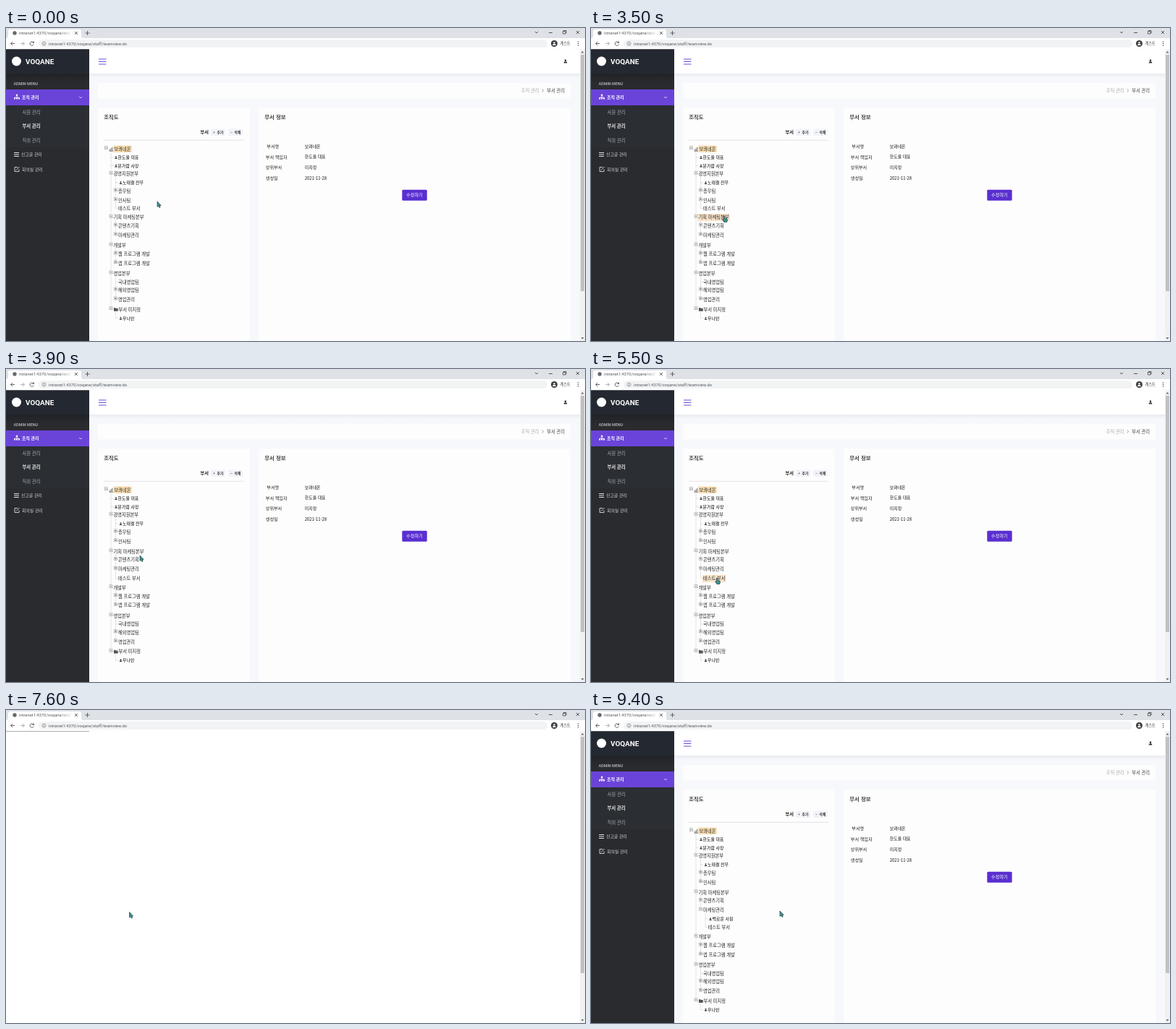
Recreate the animation shown at these times as an HTML page. Size 800 by 433 pixels, loop 9.5 s.

```html
<!DOCTYPE html>
<html lang="ko">
<head>
<meta charset="utf-8">
<style>
  html, body { margin: 0; width: 100%; height: 100%; overflow: hidden; background: #f7f8fc; }
  svg { display: block; width: 800px; height: 433px; }
  text { font-family: "Noto Sans CJK KR", "Noto Sans CJK", sans-serif; white-space: pre; }
  .latin { font-family: Roboto, sans-serif; }
</style>
</head>
<body>
<svg id="stage" viewBox="0 0 800 433">
  <defs>
    <linearGradient id="shade" x2="0" y2="1">
      <stop stop-color="#e9ebf0"/><stop offset="1" stop-color="#f7f8fc"/>
    </linearGradient>
    <linearGradient id="dim" x2="0" y2="1">
      <stop stop-opacity=".2"/><stop offset="1" stop-opacity="0"/>
    </linearGradient>
    <linearGradient id="fade">
      <stop stop-color="#fff" stop-opacity="0"/><stop offset="1" stop-color="#fff"/>
    </linearGradient>
  </defs>
  <g id="page"></g><g id="status"></g><g id="tree"></g><g id="cursor"></g>
</svg>
<script>
const $ = id => document.getElementById(id);
const LOOP = 9500, STEP = 100;
const ADDRESS = 'intranet1:4370/voqane/staff/teamview.do';

// y is the vertical centre of the text
const text = (x, y, s, size, fill = '#222', weight = 400, cls = '') =>
  `<text x="${x}" y="${y + size * .37}" font-size="${size}" fill="${fill}" font-weight="${weight}" class="${cls}">${s}</text>`;
const rect = (x, y, w, h, fill, more = '') =>
  `<rect x="${x}" y="${y}" width="${w}" height="${h}" fill="${fill}" ${more}/>`;
const line = (d, stroke, w = 1, more = '') =>
  `<path d="${d}" fill="none" stroke="${stroke}" stroke-width="${w}" ${more}/>`;
const shape = (d, fill) => `<path d="${d}" fill="${fill}"/>`;
const circle = (x, y, r, fill) => `<circle cx="${x}" cy="${y}" r="${r}" fill="${fill}"/>`;
const person = (x, y, s = 1, fill = '#333') =>
  `<g transform="translate(${x} ${y}) scale(${s})">${circle(0, -1.2, 1.3, fill)}${shape('M-2.4 2.5q0-2.3 2.4-2.3t2.4 2.3z', fill)}</g>`;

function browser() {
  return rect(0, 0, 800, 14, '#dee1e6') +
    shape('M0 14q3 0 3-3V5q0-3 3-3h95q3 0 3 3v6q0 3 3 3z', '#fff') +
    text(18, 7, ADDRESS.slice(0, 27), 5.8, '#55585d', 400, 'latin') +
    rect(76, 3, 15, 9, 'url(#fade)') +
    line('M95 5l4 4m0-4l-4 4', '#444', .8) + line('M109.5 7h6m-3-3v6', '#444', .8) +
    line('M731 5l2 2 2-2M750 6.5h5M788 4l4 4m0-4l-4 4', '#333', .8) +
    line('M769.5 4.5h3.5v3.5h-3.5zM770.5 4.5v-1h3.5v3.5h-1', '#333', .7) +
    rect(0, 14, 800, 15.5, '#fff') + rect(45, 16, 703, 11, '#f1f3f4', 'rx="5.5"') +
    line('M12 21.5H6.5m2.5-2.5l-2.5 2.5 2.5 2.5', '#555', .9) +
    line('M20 21.5h5.5m-2.5-2.5l2.5 2.5-2.5 2.5', '#aaa', .9) +
    `<circle cx="52.5" cy="21.5" r="2.5" fill="none" stroke="#666" stroke-width=".6"/>` +
    line('M52.5 20v.6m0 .7v1.8', '#666', .7) +
    text(59, 21.5, ADDRESS, 5.8, '#55585d', 400, 'latin') +
    circle(757.5, 21.5, 4.5, '#3c4043') + person(757.5, 21.5, .95, '#fff') +
    text(765.5, 21.5, '게스트', 5.2, '#333') +
    [19, 21.5, 24].map(y => circle(790.5, y, .7, '#444')).join('');
}

function sidebar() {
  return rect(0, 29.5, 115, 404, '#2a2b2f') + rect(0, 29.5, 115, 33.5, '#242830') +
    rect(0, 63, 115, 14, 'url(#dim)') +
    circle(14.5, 46, 6.5, '#fff') + text(27, 46.2, 'VOQANE', 9.9, '#fff', 700, 'latin') +
    text(10.5, 76.8, 'ADMIN MENU', 5.4, '#b9bbc0', 500, 'latin') +
    rect(0, 85, 115, 22, '#6a44d9') + rect(0, 107, 115, 58, '#2b2e33') +
    line('M15 93v3m-3 2v-2h6v2M15 96v2', '#fff', .8) +
    rect(13.8, 91.8, 2.4, 2, '#fff') + [11, 14, 17].map(x => rect(x, 96.5, 2, 2, '#fff')).join('') +
    text(22, 95.6, '조직 관리', 5.9, '#fff', 700) + line('M101 95l2 2 2-2', '#fff', .7) +
    text(22.5, 116.3, '사원 관리', 6.3, '#a9abb1') +
    text(22.5, 135.6, '부서 관리', 6.3, '#e8e8ea', 700) +
    text(22.5, 155.3, '직위 관리', 6.3, '#a9abb1') +
    line('M11 172.5h7m-7 2.5h7m-7 2.5h7', '#ddd', 1.2) + text(21, 175.3, '신고글 관리', 5.9, '#d5d6d9') +
    line('M16 192.5h-4v6h6v-3m-4 1l4.5-4.5', '#ddd', .9) + text(22, 195.8, '회의실 관리', 5.9, '#d5d6d9');
}

function content() {
  const card = (x, y, w, h) => rect(x, y, w, h, '#fdfdfe', 'rx="2"');
  const info = [['부서명', '보콰네온', 163.5], ['부서 책임자', '한도율 대표', 178.3],
    ['상위부서', '미지정', 193], ['생성일', '2021-11-28', 207.7]];
  return rect(115, 29.5, 678, 404, '#f7f8fc') + rect(115, 63, 678, 6, 'url(#shade)') +
    rect(115, 29.5, 678, 33.5, '#fff') +
    line('M128 43h10.5M128 46.5h10.5M128 50h10.5', '#6a4dd6', 1) + person(773, 46, 1) +
    card(127, 76, 653, 21.5) + card(127, 110, 209.5, 330) + card(349, 110, 431, 330) +
    text(711.7, 86.5, '조직 관리', 6.3, '#aaa') + line('M740.5 84.5l2.5 2-2.5 2', '#888', .7) +
    text(747.2, 86.5, '부서 관리', 6.3, '#444') +
    text(135.2, 123, '조직도', 7.4, '#444', 700) + text(357.3, 123, '부서 정보', 7.4, '#444', 700) +
    text(268.5, 144, '부서', 6.2, '#222', 700) +
    [['+', '추가', 283], ['−', '삭제', 307]].map(([sign, s, x]) =>
      rect(x, 139.5, 20, 9.5, '#f2f3f9', 'rx="1.5"') + text(x + 3, 144.2, sign, 5.2) +
      text(x + 8.5, 144.2, s, 4.8, '#333', 700)).join('') +
    line('M135 155.3h193', '#dcdde2', .8) +
    info.map(([k, v, y], i) => text(i ? 358.8 : 360.3, y, k, 6.1) + text(412.8, y, v, 5.9, '#111')).join('') +
    rect(547.3, 223.7, 34.4, 15, '#5a2fd0', 'rx="1.5"') + text(553, 231.2, '수정하기', 6.2, '#fff') +
    rect(793, 29.5, 7, 404, '#f1f1f1') + rect(794, 37, 5, 327, '#c1c1c1') +
    shape('M794.5 34.5l2-2.5 2 2.5zM794.5 428l2 2.5 2-2.5z', '#666');
}

// [level, kind, label, y]; kinds: - open, + closed, p person, f folder, r root
const HEAD = [[0, 'r', '보콰네온', 167.2], [1, 'p', '한도율 대표', 179], [1, 'p', '문가람 사장', 190.5],
  [1, '-', '경영지원본부', 202], [2, 'p', '노태결 전무', 214], [2, '+', '총무팀', 225.5], [2, '+', '인사팀', 238.3]];
const MID = [[1, '-', '기획 마케팅본부', 262], [2, '+', '콘텐츠기획', 273.5], [2, '+', '마케팅관리', 286.5]];
const TAIL = [[1, '-', '개발부', 300.5], [2, '+', '웹 프로그램 개발', 312.5], [2, '+', '앱 프로그램 개발', 325.3],
  [1, '-', '영업본부', 339.5], [2, '', '국내영업팀', 351.2], [2, '+', '해외영업팀', 362.5],
  [2, '+', '영업관리', 375.5], [1, 'f', '부서 미지정', 389.2], [2, 'p', '우나빈', 401.5]];
const MOVED = '테스트 부서';
const shift = (rows, dy) => rows.map(([l, k, s, y]) => [l, k, s, y + dy]);

function rowsAt(t) {
  if (t < 3800) return [...HEAD, [2, '', MOVED, 249.7], ...MID, ...TAIL];
  const mid = shift(MID, -9.7);
  if (t < 7700) return [...HEAD, ...mid, [2, '', MOVED, 290], ...shift(TAIL, 1.7)];
  if (t < 8500) return [...HEAD, ...mid, ...shift(TAIL, -9.8)];
  mid[2][1] = '-';
  return [...HEAD, ...mid, [3, 'p', '백로운 사원', 289], [3, '', MOVED, 300.3], ...shift(TAIL, 13.2)];
}

const TREE_FONT = 6.25;
const branchX = level => 138.5 + 6.5 * level;
const labelX = ([level, kind]) => branchX(level) + 3.6 + ({ r: 7.5, p: 6, f: 7 }[kind] || 0);
const labelWidth = s => [...s].reduce((w, c) => w + (c === ' ' ? .224 : .92) * TREE_FONT, 0);
const isOver = (row, p) => Math.abs(p.y - row[3]) < 4.5 &&
  p.x > labelX(row) && p.x < labelX(row) + labelWidth(row[2]);

function drawTree(rows, hover) {
  let lines = '', nodes = '';
  rows.forEach((row, i) => {
    const [level, kind, label, y] = row, x = branchX(level), tx = labelX(row);
    let end = 0;
    for (let j = i + 1; j < rows.length && rows[j][0] > level; j++)
      if (rows[j][0] === level + 1) end = rows[j][3];
    if (end) lines += `M${x + 6.5} ${y + 4}V${end}`;
    lines += `M${x} ${y}h4`;
    if (kind && kind !== 'p') {
      nodes += rect(x - 2, y - 3.5, 4, 4, '#fff', 'stroke="#999" stroke-width=".6"') +
        line(`M${x - 1.2} ${y - 1.5}h2.4` + (kind === '+' ? 'm-1.2-1.2v2.4' : ''), '#333', .6);
    }
    if (kind === 'r') nodes += line(`M${x + 4} ${y + 3}h5.5M${x + 5} ${y + 2.5}v-2m1.7 2v-3.5m1.7 3.5v-5`, '#666', .9);
    if (kind === 'p') nodes += person(x + 7, y, .75);
    if (kind === 'f') nodes += shape(`M${x + 4} ${y - 2.2}h2l.7.8h3v4h-5.7z`, '#555');
    if (kind === 'r' || row === hover)
      nodes += rect(tx - .8, y - 4.3, labelWidth(label) + 1.6, 8.6, kind === 'r' ? '#fde2b4' : '#fbe5cd',
        'stroke="#f3cf98" stroke-width=".5"');
    nodes += text(tx, y, label, kind === 'p' ? 5.9 : TREE_FONT, kind === 'p' ? '#000' : '#222');
  });
  return line(lines, '#aaa', .6, 'stroke-dasharray="1 1"') + nodes;
}

// [time, x, y] of the pointer tip
const PATH = [[0, 209, 240], [400, 209, 240], [1200, 175, 249], [1600, 175, 249], [2100, 181, 249.5],
  [2700, 184, 260], [3600, 184, 260], [3900, 185, 258], [4300, 185, 258], [5100, 174, 289], [5500, 174, 289],
  [6300, 175, 276], [7200, 175, 276], [7700, 170, 280], [7900, 170, 280], [8300, 152, 275], [8600, 152, 275],
  [9300, 261, 278], [LOOP, 261, 278]];
const DRAGS = [[1700, 2800], [5600, 6700]];
const LOADS = [[2900, 3400], [6800, 7500]];
const BLANKS = [[3700, 3800], [7600, 7700]];
const during = (spans, t) => spans.find(([a, b]) => t >= a && t < b);

function pointerAt(t) {
  const i = PATH.findIndex(p => p[0] > t), [t0, x0, y0] = PATH[i - 1], [t1, x1, y1] = PATH[i];
  const u = (t - t0) / (t1 - t0), e = u * u * (3 - 2 * u);
  return { x: x0 + (x1 - x0) * e, y: y0 + (y1 - y0) * e };
}

function drawPointer({ x, y }, hand) {
  const d = hand
    ? 'M-.8 .5q.8-1 1.5 0v3l3 .6q1 .3.8 1.4l-.7 3h-4l-2-3q-.2-1.2 1.4-.3z'
    : 'M0 0v7.5l1.7-1.5 1.2 2.5 1.3-.6-1.2-2.4h2.2z';
  return `<path transform="translate(${x} ${y})" d="${d}" fill="#3b9491" stroke="#24403f" stroke-width=".7"/>`;
}

function drawStatus(loading) {
  return loading
    ? line('M33.5 19l5 5m0-5l-5 5', '#555', .9) + line('M9.5 7a2.5 2.5 0 0 1 2.5-2.5', '#d5d8dd', .8)
    : line('M38 20a2.7 2.7 0 1 0 .4 2.5M38.5 18.5v2h-2', '#555', .9) + circle(12, 7, 2.7, '#66696e');
}

function drawGhost(rows, p, start) {
  const grab = pointerAt(start - 100), row = rows.find(r => r[2] === MOVED);
  const x = labelX(row) + p.x - grab.x, y = row[3] + p.y - grab.y;
  return rect(x - .5, y - 4, labelWidth(MOVED) + 1, 8, '#fbe5cd', 'opacity=".4"') + text(x, y, MOVED, TREE_FONT);
}

function render(t) {
  const p = pointerAt(t), rows = rowsAt(t), drag = during(DRAGS, t), loading = during(LOADS, t);
  const hover = rows.find(r => isOver(r, p) && !(drag && r[2] === MOVED));
  const blank = during(BLANKS, t);
  $('tree').innerHTML = blank ? rect(0, 29.5, 793, 404, '#fff')
    : drawTree(rows, hover) + (drag ? drawGhost(rows, p, drag[0]) : '');
  $('status').innerHTML = drawStatus(loading);
  $('cursor').innerHTML = drawPointer(p, !loading && !blank && (drag || hover));
}

$('page').innerHTML = browser() + content() + sidebar();
let shown = -1;
function tick() {
  const t = Math.floor(performance.now() % LOOP / STEP) * STEP;
  if (t !== shown) render(shown = t);
  requestAnimationFrame(tick);
}
tick();
</script>
</body>
</html>
```
